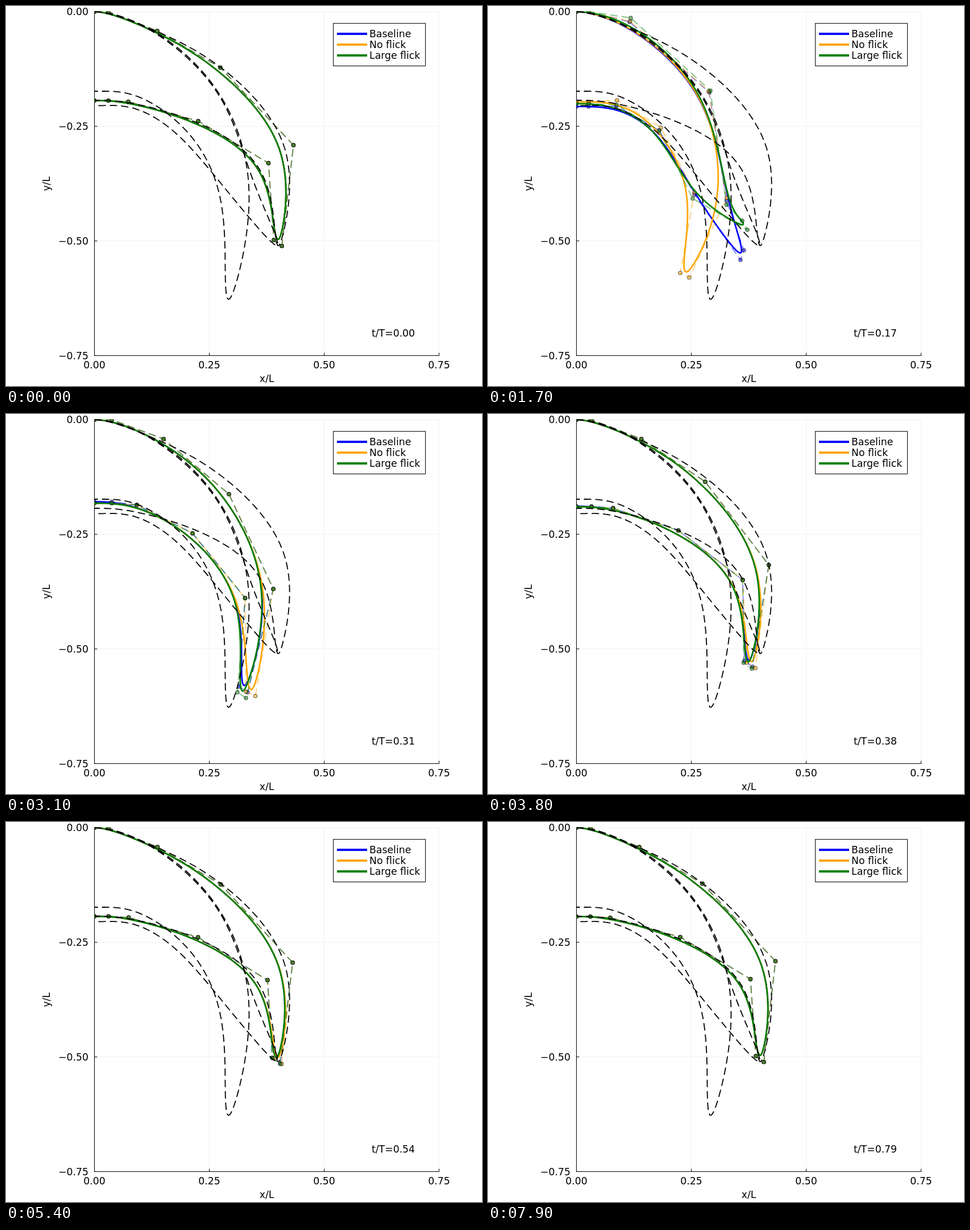
Recreate the animation shown at these times as an HTML page. Size 837 px wide and 669 px high, loop 8 s.

```html
<!DOCTYPE html>
<html lang="en">
<head>
<meta charset="utf-8">
<title>Bell kinematics</title>
<style>
  html, body { margin: 0; width: 100%; height: 100%; overflow: hidden; background: #fff; }
  svg { display: block; width: 837px; height: 669px; }
  text { font: 17.3px "DejaVu Sans", sans-serif; fill: #000; }
  .line { fill: none; stroke-linejoin: round; }
</style>
</head>
<body>
<svg id="stage" viewBox="0 0 837 669">
  <defs><clipPath id="plot"><rect x="155" y="9.5" width="607" height="606"/></clipPath></defs>
</svg>
<script>
const stage = document.getElementById('stage');
const LEFT = 155.5, TOP = 10, STEP = 202, BOTTOM = 615.5, RIGHT = 761.5;

function add(parent, tag, attrs, text) {
  const node = document.createElementNS('http://www.w3.org/2000/svg', tag);
  for (const key in attrs) node.setAttribute(key, attrs[key]);
  if (text !== undefined) node.textContent = text;
  parent.appendChild(node);
  return node;
}

const segment = (x1, y1, x2, y2, stroke, width = 1) =>
  add(stage, 'line', { x1, y1, x2, y2, stroke, 'stroke-width': width });
const label = (x, y, text, anchor = 'start', extra = {}) =>
  add(stage, 'text', { x, y, 'text-anchor': anchor, ...extra }, text);

function drawAxes() {
  for (let i = 0; i < 4; i++) {
    const x = LEFT + STEP * i, y = TOP + i * 201.8;
    segment(x, TOP, x, BOTTOM, '#f0f0f0');
    segment(LEFT, y, RIGHT, y, '#f0f0f0');
  }
  segment(LEFT, TOP, LEFT, BOTTOM + .5, '#000');
  segment(LEFT - .5, BOTTOM, RIGHT + .5, BOTTOM, '#000');
  for (let i = 0; i < 4; i++) {
    const x = LEFT + STEP * i, y = TOP + i * 201.8, value = (i / 4).toFixed(2);
    segment(x, BOTTOM, x, BOTTOM - 5, '#000');
    segment(LEFT, y, LEFT + 5, y, '#000');
    label(x, 638, value, 'middle');
    label(145, y + 6.3, (i ? '−' : '') + value, 'end');
  }
  label(458.5, 662, 'x/L', 'middle');
  label(0, 0, 'y/L', 'middle', { transform: 'translate(77 313) rotate(-90)' });
}

// Clamped uniform cubic B-spline, evaluated with de Boor's scheme.
function splinePath(points) {
  const spans = points.length - 3, steps = 14;
  const knot = i => Math.min(spans, Math.max(0, i - 3));
  let path = '';
  for (let n = 0; n <= spans * steps; n++) {
    const u = n / steps, k = Math.min(spans - 1, Math.floor(u)) + 3;
    const d = points.slice(k - 3, k + 1);
    for (let r = 1; r <= 3; r++) {
      for (let j = 3; j >= r; j--) {
        const lo = knot(j + k - 3), a = (u - lo) / (knot(j + 1 + k - r) - lo);
        d[j] = [0, 1].map(c => d[j - 1][c] * (1 - a) + d[j][c] * a);
      }
    }
    path += (n ? 'L' : 'M') + d[3].map(v => v.toFixed(2));
  }
  return path;
}

// A pose is: three outer points, four inner points, then the two tip points.
function polygon(pose) {
  const p = [];
  for (let i = 0; i < pose.length; i += 2) p.push([pose[i], pose[i + 1]]);
  const root = p[6];
  return [[LEFT, TOP], [root[0], TOP], p[0], p[1], p[2], p[7], p[8],
          p[3], p[4], p[5], root, [LEFT, root[1]]];
}

const body = {
  rest:    [266, 44, 377, 108.5, 505.5, 245, 461.5, 276.5, 338, 202.5, 215, 168.5, 180, 166.5],
  squeeze: [249, 31, 383, 121, 467, 294.5, 411, 302, 321, 204.5, 218, 163, 176, 163.5],
  flick:   [249, 28, 389, 152, 419.5, 343, 363, 332, 301, 219, 226, 176, 177, 177],
  closed:  [265, 36, 386, 145, 445, 320, 390, 335, 327, 215, 226, 148, 184, 150],
  opening: [277, 44, 392, 141, 470, 308, 420.5, 324, 328, 210, 230, 160, 186, 154.5]
};
const restTip = [485, 422.5, 471, 412];

const series = [
  { name: 'Baseline', color: '#0000ff', root: 0, nudge: Array(14).fill(0),
    tips: { squeeze: [512, 431, 499, 442], flick: [450, 430, 444, 447], closed: [398, 529, 382, 520],
            opening: [425, 490, 410, 480], settle: [480, 428, 466, 418.5] } },
  { name: 'No flick', color: '#ffa500', root: 2.5,
    nudge: [1, -1, -1, -2, 0, -5, 0, -4, 3, -5, 1, -10, 0, -8],
    tips: { squeeze: [418, 451.5, 403, 442.5], flick: [354, 478, 338, 470], closed: [396, 515, 380, 506],
            opening: [438.5, 496.5, 422, 489], settle: [485.5, 430.5, 470.5, 421] } },
  { name: 'Large flick', color: '#008000', root: 2.5,
    nudge: [2, -7, 2, -3, 0, 7, -3, 7, 0, 0, 0, -2, 0, -5],
    tips: { squeeze: [543.5, 399.5, 540, 417], flick: [447, 378, 456, 394], closed: [398, 520, 384, 514],
            opening: [422, 500, 407, 490], settle: [478.5, 429, 464, 419] } }
];

const mix = (a, b, w) => a.map((v, i) => v + (b[i] - v) * w);

function buildKeys({ tips, root, nudge }) {
  const pose = name => {
    const shape = body[name].slice();
    if (name === 'flick') nudge.forEach((v, i) => shape[i] += v);
    else shape[13] += root;
    return [...shape, ...tips[name]];
  };
  const rest = [...body.rest, ...restTip], opening = pose('opening');
  const settle = [...mix(body.rest, opening.slice(0, 14), .08), ...tips.settle];
  return [
    [0, rest], [.09, pose('squeeze')], [.17, pose('flick')], [.25, pose('closed')], [.31, opening],
    [.37, mix(rest, opening, .38)], [.46, settle], [.62, mix(rest, opening, .02)], [.79, rest]
  ];
}

// Cubic Hermite through the keys; slopes are clipped where a value turns.
function poseAt(keys, t) {
  let k = 0;
  while (k < keys.length - 2 && t >= keys[k + 1][0]) k++;
  const [t0, a] = keys[k], [t1, b] = keys[k + 1], h = t1 - t0, s = (t - t0) / h;
  const rate = (j, i) => (keys[j + 1][1][i] - keys[j][1][i]) / (keys[j + 1][0] - keys[j][0]);
  const slope = (j, i) => {
    if (j === 0 || j === keys.length - 1) return 0;
    const before = rate(j - 1, i), after = rate(j, i);
    return before * after <= 0 ? 0 : 2 * before * after / (before + after);
  };
  const ease = s * s * (3 - 2 * s);
  return a.map((v, i) => v + (b[i] - v) * ease
    + h * (s * (1 - s) ** 2 * slope(k, i) - s * s * (1 - s) * slope(k + 1, i)));
}

drawAxes();
const plot = add(stage, 'g', { 'clip-path': 'url(#plot)' });

for (const item of series) {
  item.keys = buildKeys(item);
  item.curve = add(plot, 'path', { class: 'line', stroke: item.color, 'stroke-width': 2.7 });
  item.frame = add(plot, 'path', { class: 'line', stroke: item.color, 'stroke-width': 1.8,
    'stroke-opacity': .5, 'stroke-dasharray': '13 7' });
  item.dots = Array.from({ length: 12 }, () => add(plot, 'circle', { r: 3.2, fill: item.color,
    'fill-opacity': .5, stroke: '#000', 'stroke-opacity': .5, 'stroke-width': 1.3 }));
}

const references = [
  [266, 43, 382, 100, 519, 243, 466, 277, 342, 201, 215, 167, 180, 166, 483, 434, 473, 424],
  [250, 28, 388, 147, 427, 300, 376, 310, 301, 218, 222, 171, 178, 175.5, 484, 420, 476, 432],
  [...body.closed, 398, 529, 382, 520]
];
for (const pose of references) {
  add(plot, 'path', { class: 'line', d: splinePath(polygon(pose)), stroke: '#000',
    'stroke-width': 1.8, 'stroke-dasharray': '13 7' });
}

add(stage, 'rect', { x: 575.5, y: 30.5, width: 162, height: 75, fill: '#fff', stroke: '#000' });
series.forEach(({ name, color }, i) => {
  const y = 49 + 19 * i;
  segment(582, y, 635, y, color, 4);
  label(639, y + 6, name);
});
const clock = label(643, 581.5, '');

function render(ms) {
  const t = Math.floor(ms % 8000 / 100) / 100;
  clock.textContent = 't/T=' + t.toFixed(2);
  for (const { keys, curve, frame, dots } of series) {
    const points = polygon(poseAt(keys, t));
    curve.setAttribute('d', splinePath(points));
    frame.setAttribute('d', 'M' + points.map(p => p.map(v => v.toFixed(2))).join('L'));
    dots.forEach((dot, i) => {
      dot.setAttribute('cx', points[i][0]);
      dot.setAttribute('cy', points[i][1]);
    });
  }
}

const start = performance.now();
function tick() {
  render(performance.now() - start);
  requestAnimationFrame(tick);
}
tick();
</script>
</body>
</html>
```
